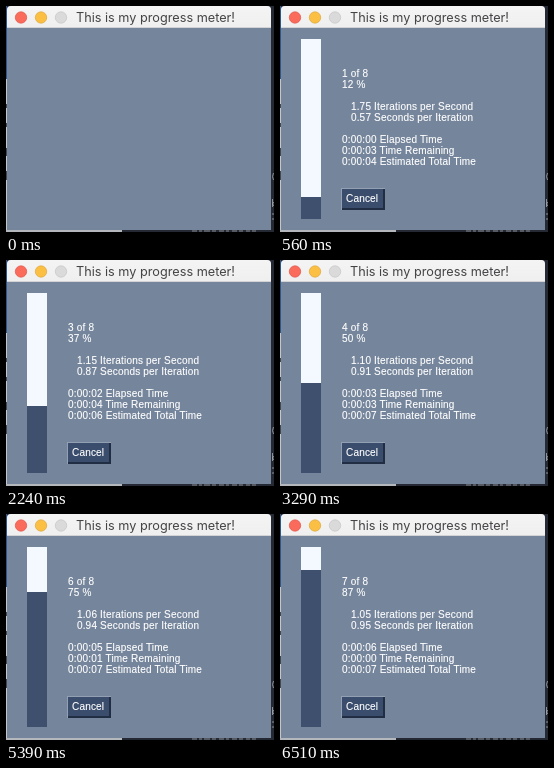
Recreate the animation shown at these times as an HTML page. Size 268 by 226 pixels, loop 7.35 s.

```html
<!DOCTYPE html>
<html lang="en">
<head>
<meta charset="utf-8">
<title>Progress meter</title>
<style>
  html, body { margin: 0; width: 100%; height: 100%; overflow: hidden; background: #252933; }
  svg { display: block; width: 268px; height: 226px; }
  text { white-space: pre; }
  .title { font: 12.7px Inter, sans-serif; fill: #444345; }
  .label { font: 10px "Liberation Sans", Arial, sans-serif; letter-spacing: .19px; fill: #fff; stroke: #fff; stroke-width: .15px; }
</style>
</head>
<body>
<svg viewBox="0 0 268 226">
  <defs>
    <linearGradient id="chrome" x2="0" y2="1">
      <stop offset="0" stop-color="#f5f4f5"/>
      <stop offset="1" stop-color="#f0eff0"/>
    </linearGradient>
  </defs>

  <!-- desktop behind the window -->
  <rect width="268" height="226" fill="#252933"/>
  <rect width="1" height="73" fill="#2c568c"/>
  <rect y="73" width="1" height="153" fill="#c3c6cb"/>
  <path d="M.5 98v4M.5 117v4M.5 142v8M.5 165v9" stroke="#43474f"/>
  <rect y="224" width="116" height="2" fill="#b4b7bc"/>
  <path d="M186 225h5m2 0h3m2 0h6m2 0h4m3 0h5m2 0h3m3 0h5m2 0h4m3 0h4m2 0h4" stroke="#878b93"/>
  <path d="M267.5 167q-2 3.500 0 7M266.500 193v8m0-3l1.500-2m-1.500 2l1.500 2M266 208h2m-2 5h2" fill="none" stroke="#a9adb5" stroke-width=".8"/>

  <!-- window -->
  <path d="M1 224V4q0-4 4-4h256q4 0 4 4v220z" fill="#75859b"/>
  <path d="M1 22V4q0-4 4-4h256q4 0 4 4v18z" fill="url(#chrome)"/>
  <rect x="1" y="21" width="264" height="1" fill="#d3d2d5"/>
  <g stroke-width=".7">
    <circle cx="15" cy="11.500" r="5.700" fill="#fa6b5c" stroke="#df5549"/>
    <circle cx="35" cy="11.500" r="5.700" fill="#fbc043" stroke="#dda63a"/>
    <circle cx="55" cy="11.500" r="5.700" fill="#dbdadb" stroke="#c5c4c5"/>
  </g>
  <text class="title" x="70" y="16">This is my progress meter!</text>

  <g id="meter">
    <rect x="21" y="33" width="20" height="180" fill="#f4f9ff"/>
    <rect id="bar" x="21" width="20" fill="#3f4f6e"/>
    <g id="lines"></g>
    <rect x="61" y="182" width="44" height="22" fill="#93a0b3"/>
    <rect x="62" y="183" width="43" height="21" fill="#202d43"/>
    <rect x="62" y="183" width="41" height="19" fill="#3b4d6d"/>
    <text class="label" x="66" y="196">Cancel</text>
  </g>
</svg>
<script>
const LOOP = 7350;
const TOTAL = 8;
const starts = [70, 1120, 2240, 3290, 4340, 5390, 6510];
const elapsed = [0.57, 1.592, 2.61, 3.64, 4.63, 5.66, 6.67];

const byId = id => document.getElementById(id);
const meter = byId("meter"), bar = byId("bar");

// rows 2 and 5 are blank
const rows = [0, 1, 3, 4, 6, 7, 8].map(row => {
  const t = document.createElementNS("http://www.w3.org/2000/svg", "text");
  t.setAttribute("class", "label");
  t.setAttribute("x", 62);
  t.setAttribute("y", 71 + 11 * row);
  byId("lines").append(t);
  return t;
});

const clock = s => "0:00:" + String(Math.floor(s)).padStart(2, "0");

function show(n) {
  meter.setAttribute("visibility", n ? "visible" : "hidden");
  if (!n) return;
  const spent = elapsed[n - 1], each = spent / n;
  const top = Math.round(213 - 180 * n / TOTAL);
  bar.setAttribute("y", top);
  bar.setAttribute("height", 213 - top);
  [
    `${n} of ${TOTAL}`,
    `${Math.floor(100 * n / TOTAL)} %`,
    `   ${(1 / each).toFixed(2)} Iterations per Second`,
    `   ${each.toFixed(2)} Seconds per Iteration`,
    `${clock(spent)} Elapsed Time`,
    `${clock(each * (TOTAL - n))} Time Remaining`,
    `${clock(each * TOTAL)} Estimated Total Time`
  ].forEach((line, i) => rows[i].textContent = line);
}

let shown = -1;
const origin = performance.now();

function tick() {
  const time = (performance.now() - origin) % LOOP;
  const n = starts.filter(s => s <= time).length;
  if (n !== shown) show(shown = n);
  requestAnimationFrame(tick);
}
tick();
</script>
</body>
</html>
```
